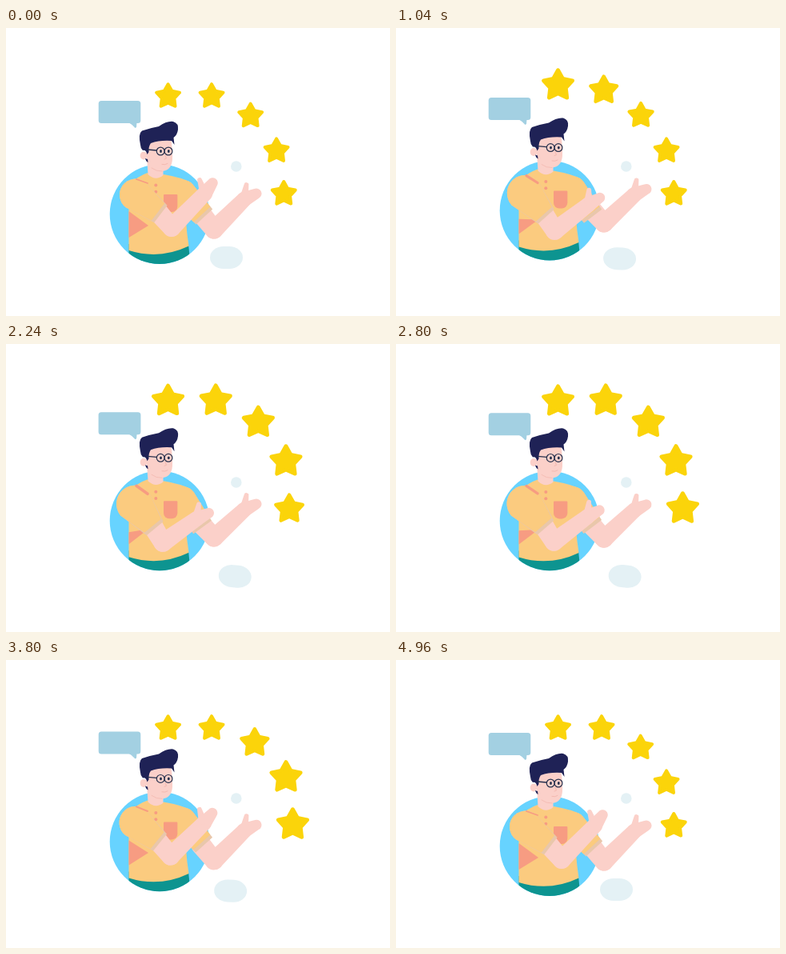
Write an HTML page with a canvas that moves like this. It is 480x360 px and loops after 5 s.

```html
<!DOCTYPE html>
<html lang="en">
<head>
<meta charset="utf-8">
<title>Five star rating</title>
<style>
  html, body { margin: 0; width: 100%; height: 100%; overflow: hidden; background: #fff; }
  canvas { display: block; width: 480px; height: 360px; }
</style>
</head>
<body>
<canvas id="stage" width="480" height="360"></canvas>
<script>
const ctx = document.getElementById('stage').getContext('2d');
const LOOP = 5000;
const { PI, sin, cos, atan2 } = Math;
const C = {
  sky: '#67d3ff', shirt: '#fbcb7f', accent: '#f79c82', skin: '#fbd0c9', shade: '#e9c7ab',
  cheek: '#f3b9b0', hair: '#1f2256', ink: '#25304d', pants: '#0d9490',
  bubble: '#a3d0e2', pale: '#e4f1f5', star: '#fbd40a'
};

const mix = (a, b, k) => a + (b - a) * k;
const mixPoint = (a, b, k) => a.map((v, i) => mix(v, b[i], k));
const ease = (t, start, length) => {
  const x = Math.min(1, Math.max(0, (t - start) / length));
  return (1 - cos(PI * x)) / 2;
};

function at(x, y, paint) {
  ctx.save();
  ctx.translate(x, y);
  paint();
  ctx.restore();
}

function fillPath(d, color) {
  ctx.fillStyle = color;
  ctx.fill(new Path2D(d));
}

function strokePath(d, color, width) {
  ctx.strokeStyle = color;
  ctx.lineWidth = width;
  ctx.stroke(new Path2D(d));
}

function disc(x, y, rx, color, ry = rx) {
  ctx.beginPath();
  ctx.ellipse(x, y, rx, ry, 0, 0, PI * 2);
  ctx.fillStyle = color;
  ctx.fill();
}

function box(x, y, w, h, radii, color) {
  ctx.beginPath();
  ctx.roundRect(x, y, w, h, radii);
  ctx.fillStyle = color;
  ctx.fill();
}

// Tapered capsule from a to b; a flat end cuts it straight at b
function limb([ax, ay], ra, [bx, by], rb, color, flat = false) {
  const a = atan2(by - ay, bx - ax), q = PI / 2;
  ctx.beginPath();
  ctx.arc(ax, ay, ra, a + q, a - q + PI * 2);
  if (flat) {
    ctx.lineTo(bx + rb * cos(a - q), by + rb * sin(a - q));
    ctx.lineTo(bx + rb * cos(a + q), by + rb * sin(a + q));
  } else {
    ctx.arc(bx, by, rb, a - q, a + q);
  }
  ctx.fillStyle = color;
  ctx.fill();
}

function sleeve(shoulder, rs, cuff, rc) {
  limb(shoulder, rs, mixPoint(shoulder, cuff, 1.12), rc, C.shade, true);
  limb(shoulder, rs, cuff, rc, C.shirt, true);
}

function arm(start, elbow, wrist, turn) {
  limb(start, 12.5, elbow, 11.5, C.skin);
  limb(elbow, 11.5, wrist, 9.5, C.skin);
  at(...wrist, () => {
    ctx.rotate(turn);
    limb([0, 0], 9.5, [15, -7], 6.5, C.skin);
    limb([0, -4], 5, [2.5, -18], 2.9, C.skin);
  });
}

function star(x, y, scale) {
  ctx.beginPath();
  for (let i = 0; i < 10; i++) {
    const r = scale * (i % 2 ? 8.2 : 15.2);
    const a = i * PI / 5 - PI / 2;
    ctx.lineTo(x + r * cos(a), y + r * sin(a));
  }
  ctx.closePath();
  ctx.fillStyle = ctx.strokeStyle = C.star;
  ctx.lineWidth = 4 * scale;
  ctx.fill();
  ctx.stroke();
}

// Stars sit evenly on a ring and swell outwards one after another
function drawStars(t) {
  for (let i = 0; i < 5; i++) {
    const k = ease(t, 150 + 380 * i, 1000) - ease(t, 2730 + 395 * i, 590);
    const a = mix(-13.5 + 26.8 * i, -14 + 27.4 * i, k) * PI / 180;
    const r = mix(117.5, 126, k);
    star(mix(230, 233, k) + r * sin(a), mix(199.7, 193.5, k) - r * cos(a), 1 + 0.25 * k);
  }
}

function drawBubble(t) {
  const lift = 6 * (ease(t, 0, 1700) - ease(t, 1900, 2900));
  const pulse = 1 + 0.08 * (ease(t, 1100, 450) - ease(t, 1650, 700));
  at(142, 105 - lift, () => {
    ctx.scale(pulse, pulse);
    box(-26.3, -14, 52.6, 28, 3.5, C.bubble);
    fillPath('M11 13 Q15 15 19.5 20 L21 19 L21.5 13Z', C.bubble);
  });
}

function drawBlob(p) {
  at(275.5 + 11 * p, 287 + 3.5 * p, () => {
    ctx.rotate(0.1 * p);
    box(-20.5, -14, 41, 28, { x: 17, y: 14 }, C.pale);
  });
}

function drawFarArm(q) {
  at(0, -7 * q, () => arm([244, 232], [260, 252 - 3 * q], [298, 214], 0));
}

function drawTorso(q) {
  sleeve([221, 207], 17, [245 - 2 * q, 233 + 4 * q], 14);

  ctx.save();
  ctx.beginPath();
  ctx.arc(192, 232.6, 62.3, 0, PI * 2);
  ctx.clip();
  fillPath('M153.5 270 H228 L231 300 H153.5Z', C.pants);
  ctx.restore();

  fillPath('M177 181 Q187 191 197 183 Q220 187 231 193 L239 215 L225 242 ' +
    'Q226 257 228.5 272.5 Q192 290 153.5 278 V196 Q165 185 177 181Z', C.shirt);
  fillPath(`M153.5 ${229 + 18 * q} L178 ${247 - 4 * q} L153.5 262Z`, C.accent);
  box(197, 208, 17.3, 22, [1, 1, 7, 7], C.accent);
  disc(187.3, 196.5, 2, C.accent);
  disc(187.3, 204.8, 2, C.accent);
}

function drawHead() {
  fillPath('M176 160 L177.5 183 Q187 192 196.5 184 V172Z', C.skin);
  disc(172, 159.5, 4.3, C.skin, 5);
  fillPath('M174 143 L206 137 Q208.5 152 208 164 Q207 178 195 179 Q180 178 176 164Z', C.skin);
  strokePath('M182 175 Q188 179.5 195 179', C.cheek, 0.8);
  fillPath('M168 146 Q165 132 170 128.5 Q180 125 191 123 Q201 116 209 117 ' +
    'Q216 119 215 127 Q214 134 209.5 137 L210.5 146 L207 141 Q192 140 181 144 ' +
    'Q178 148 178.5 155 L176.5 158 Q175 152 171 153 Q168 150 168 146Z', C.hair);
  fillPath('M174 163 L177 164 L177.5 168 Q175 167 174 163Z', C.hair);

  for (const x of [193.2, 203]) {
    disc(x + 0.3, 154, 1.4, C.ink, 1.9);
    ctx.beginPath();
    ctx.arc(x, 154, 4.9, 0, PI * 2);
    ctx.strokeStyle = C.ink;
    ctx.lineWidth = 1.2;
    ctx.stroke();
  }
  strokePath('M177 152 L188 153', C.ink, 1.3);
  strokePath('M199 159 L200.5 163 L198 164 M195 170.5 Q199 171.5 202 169.5', C.cheek, 1);
}

function drawNearArm(q) {
  const shoulder = mixPoint([162, 208.5], [161, 211.5], q);
  const cuff = mixPoint([190, 230], [183.5, 239], q);
  const elbow = mixPoint([207, 249.5], [196, 260], q);
  const wrist = mixPoint([248.5, 207], [238.5, 230], q);
  arm(cuff, elbow, wrist, -0.5 * (1 - q));
  sleeve(shoulder, mix(20, 23, q), cuff, 13.5);
  strokePath(`M163 189 L177 ${194 + 5 * q}`, C.accent, mix(1.8, 3.6, q));
}

function draw(t) {
  const p = (1 - cos(2 * PI * t / LOOP)) / 2;
  const q = ease(t, 100, 1350) - ease(t, 2400, 1800);
  const bob = -12 * p;
  ctx.clearRect(0, 0, 480, 360);
  ctx.lineJoin = ctx.lineCap = 'round';

  drawBlob(p);
  disc(287.8, 173, 6.8, C.pale);
  drawBubble(t);
  drawStars(t);
  disc(192, 232.6 + bob, 62.3, C.sky);
  drawFarArm(q);
  at(0, bob, () => {
    drawTorso(q);
    drawHead();
    drawNearArm(q);
  });
}

const begin = performance.now();
function tick() {
  draw((performance.now() - begin) % LOOP);
  requestAnimationFrame(tick);
}
tick();
</script>
</body>
</html>
```
